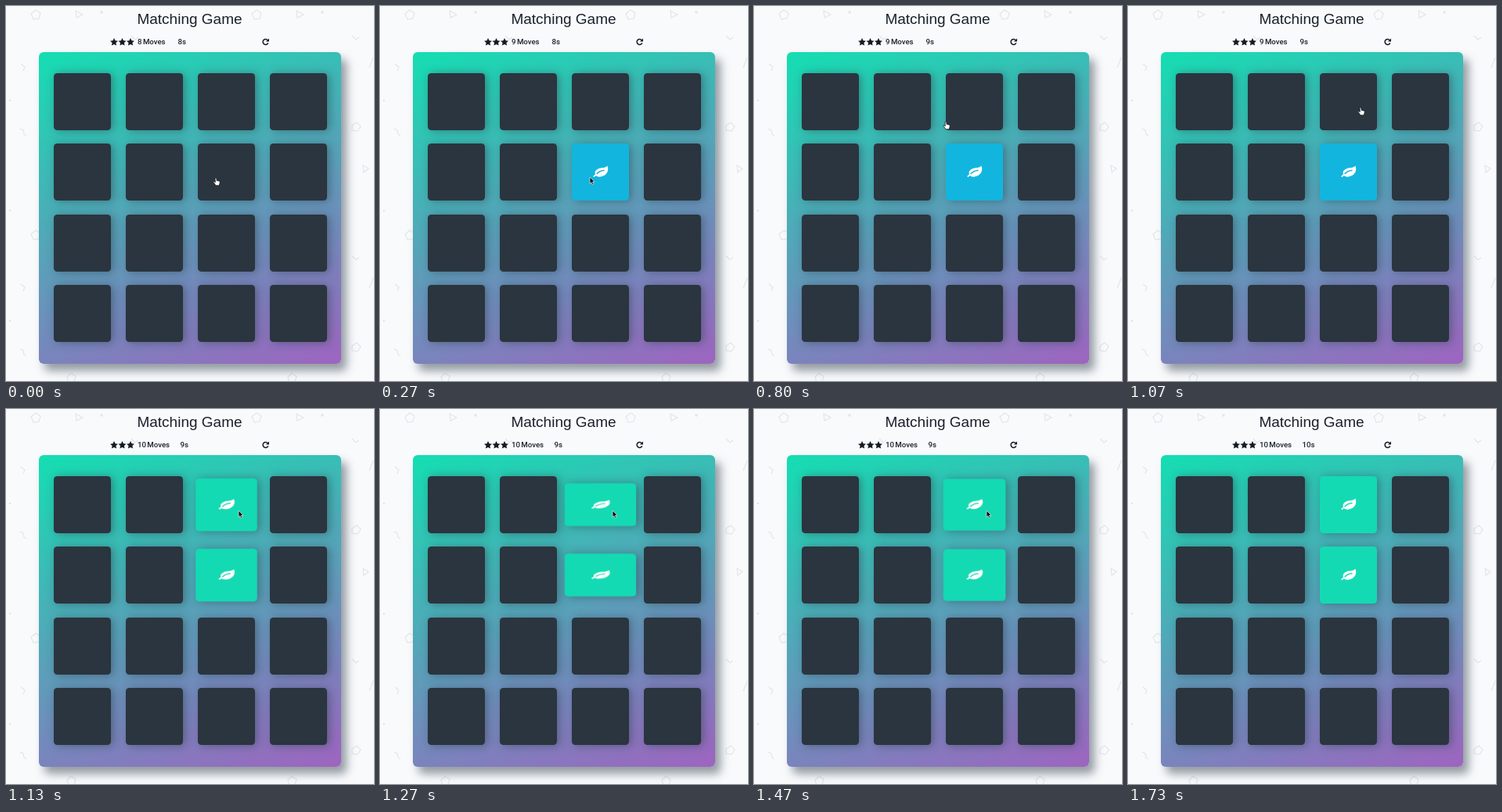
Write an HTML page that moves like this. It is 470 by 480 pixels and loops after 1.79 s.

```html
<!DOCTYPE html>
<html lang="en">
<head>
<meta charset="utf-8">
<title>Matching Game</title>
<style>
  html, body { margin: 0; width: 100%; height: 100%; overflow: hidden; background: #f9fafc; }
  #stage { position: relative; width: 470px; height: 480px; overflow: hidden; }
  svg { position: absolute; left: 0; top: 0; overflow: visible; }
  #deck {
    position: absolute; left: 42px; top: 59px; width: 386px; height: 399px;
    border-radius: 6px;
    background: linear-gradient(160deg, #14deb2, #9e64c0);
    box-shadow: 7px 9px 12px rgba(46, 61, 73, .5);
  }
  .card {
    position: absolute; width: 73px; height: 73px; border-radius: 4.5px;
    background: #2a353f;
    box-shadow: 3px 1px 12px rgba(46, 61, 73, .5);
  }
  .card svg { left: 36.5px; top: 36px; display: none; }
  .open svg { display: block; }
  .open { background: #12b5de; color: #12b5de; }
  .match { background: #14dab3; color: #14dab3; }
  .title { font: 19px "Liberation Sans", Arial, sans-serif; fill: #18212a; }
  .stat { font: 500 9.7px Roboto, sans-serif; fill: #1b232b; word-spacing: -.9px; letter-spacing: -.05px; }
</style>
</head>
<body>
<div id="stage">
  <svg width="470" height="480">
    <defs>
      <pattern id="marks" width="282" height="282" patternUnits="userSpaceOnUse">
        <g fill="none" stroke="#e4e5e9" stroke-width="1.2">
          <path d="M32 10l6-5 6 4-2 7-7 1z"/>
          <path d="M89 6l9 5-8 4z"/>
          <path d="M174 204l7 4-6 5z"/>
          <path d="M187 66l-5 13"/>
          <path d="M160 153l6-4 5 5-4 6-7-1z"/>
          <path d="M78 193l5-5 6 4-2 7-7 1z"/>
          <path d="M19 74l5 4-2 5"/>
          <path d="M18 157l4 2 1 5 3 2"/>
          <path d="M160 38l5 5 4-3"/>
        </g>
        <g fill="#e4e5e9">
          <circle cx="5" cy="121" r="1.3"/>
          <circle cx="122" cy="8" r="1.8"/>
          <circle cx="5" cy="262" r="1.3"/>
        </g>
      </pattern>
      <path id="star" d="M0-5 1.5-1.7 5-1.3 2.4 1.1 3.1 4.6 0 2.9-3.1 4.6-2.4 1.1-5-1.3-1.5-1.7z"/>
    </defs>
    <rect width="470" height="480" fill="url(#marks)"/>
    <text class="title" x="234.5" y="22.5" text-anchor="middle">Matching Game</text>
    <g fill="#151c23">
      <use href="#star" x="138" y="46"/>
      <use href="#star" x="148.5" y="46"/>
      <use href="#star" x="159" y="46"/>
      <path d="M336 41.5v4h-4z"/>
    </g>
    <path d="M334.3 43.6A3.5 3.5 0 1 0 334.8 47.4" fill="none" stroke="#151c23" stroke-width="1.5"/>
    <text class="stat" id="moves" x="168" y="49.2"></text>
    <text class="stat" id="clock" y="49.2"></text>
  </svg>
  <div id="deck"></div>
  <svg id="cursor" width="1" height="1">
    <path id="arrow" d="M0 0v8.4l1.9-1.7 1.3 3 1.5-.7-1.3-2.9h2.7z"
      fill="#0b0d10" stroke="#e8eaec" stroke-width=".7"/>
    <path id="hand" d="M-1 .8C-1-.4.8-.4.9.8L1.2 3.6 2.2 3.4 3.4 3.9 4.6 4.2C5.4 4.6 5.3 6 4.9 7.2L4.2 9.8H-.2L-1.5 7.6-3.2 5.5C-3.2 4.4-1.8 4.6-.7 5.8z"
      fill="#fff" stroke="#14191e" stroke-width=".8"/>
  </svg>
</div>
<script>
  const LOOP = 1790, STEP = 1000 / 15, LAST = 26;
  const FIRST_CLICK = 130, SECOND_CLICK = 1095, MATCH_END = 1700;
  const $ = id => document.getElementById(id);

  const leaf = `<svg width="1" height="1">
    <path fill="#fff" d="M8.3-7.6C6-4.2 0-5.8-4-3.2-7.2-1-8 .2-7 3.4-8.5 4.6-10 5.3-9.6 6.2-9 7.6-7.6 6.8-6.2 5.1-4 7-.5 7.2 3 5.6 8 3.4 10.8-2 8.3-7.6Z"/>
    <path fill="none" stroke="currentColor" stroke-width="1.4" stroke-linecap="round" d="M-5 2.8C-3 .3 0-1.3 4-1.5"/>
  </svg>`;

  const cards = Array.from({ length: 16 }, (_, i) => {
    const el = document.createElement("div");
    const x = 60.5 + 92 * (i % 4), y = 86 + 90.3 * Math.floor(i / 4);
    el.className = "card";
    el.style.left = x + "px";
    el.style.top = y + "px";
    el.innerHTML = leaf;
    $("stage").insertBefore(el, $("cursor"));
    return { el, x, y, closed: true };
  });
  const [upper, lower] = [cards[2], cards[6]];

  // Rubber band: time, x scale, y scale
  const band = [
    [SECOND_CLICK, 1, 1], [1283, 1.25, .75], [1360, .75, 1.25], [1447, 1.15, .85],
    [1545, .95, 1.05], [1595, 1.05, .95], [MATCH_END, 1, 1]
  ];
  const span = MATCH_END - SECOND_CLICK;
  const bounces = [upper, lower].map(({ el }) => {
    const anim = el.animate(
      band.map(([t, sx, sy]) => ({
        offset: (t - SECOND_CLICK) / span, transform: `scale(${sx}, ${sy})`, easing: "ease"
      })),
      { duration: span, fill: "both" }
    );
    anim.pause();
    return anim;
  });

  // Pointer tip: time, x, y
  const path = [
    [0, 268, 220], [133, 268, 219], [420, 268, 219], [800, 245, 148],
    [870, 248, 146], [1050, 297, 130], [1580, 297, 130], [1733, 346, 193]
  ];

  function tipAt(t) {
    const i = Math.max(1, path.findIndex(p => p[0] >= t));
    const [t0, x0, y0] = path[i - 1], [t1, x1, y1] = path[i];
    const u = (t - t0) / (t1 - t0), k = u * u * (3 - 2 * u);
    return [x0 + (x1 - x0) * k, y0 + (y1 - y0) * k];
  }

  function flip(card, open, match) {
    card.closed = !open;
    card.el.classList.toggle("open", open);
    card.el.classList.toggle("match", match);
  }

  function draw(now) {
    const frame = Math.min(LAST, Math.floor((now % LOOP + 4) / STEP));
    const t = frame * STEP;
    const first = t >= FIRST_CLICK, second = t >= SECOND_CLICK;

    flip(lower, first, second);
    flip(upper, second, second);
    const age = Math.min(span, Math.max(0, t - SECOND_CLICK));
    bounces.forEach(b => b.currentTime = age);

    $("moves").textContent = `${8 + first + second} Moves`;
    $("clock").textContent = `${8 + (t >= 530) + (t >= 1530)}s`;
    $("clock").setAttribute("x", second ? 222.5 : 219.5);

    const [x, y] = tipAt(t);
    const hover = cards.some(c => c.closed && x >= c.x && x <= c.x + 73 && y >= c.y && y <= c.y + 73);
    $("cursor").style.transform = `translate(${x}px, ${y}px)`;
    $("hand").style.display = hover ? "" : "none";
    $("arrow").style.display = hover ? "none" : "";
  }

  const start = performance.now();
  function tick() {
    draw(performance.now() - start);
    requestAnimationFrame(tick);
  }
  tick();
</script>
</body>
</html>
```
